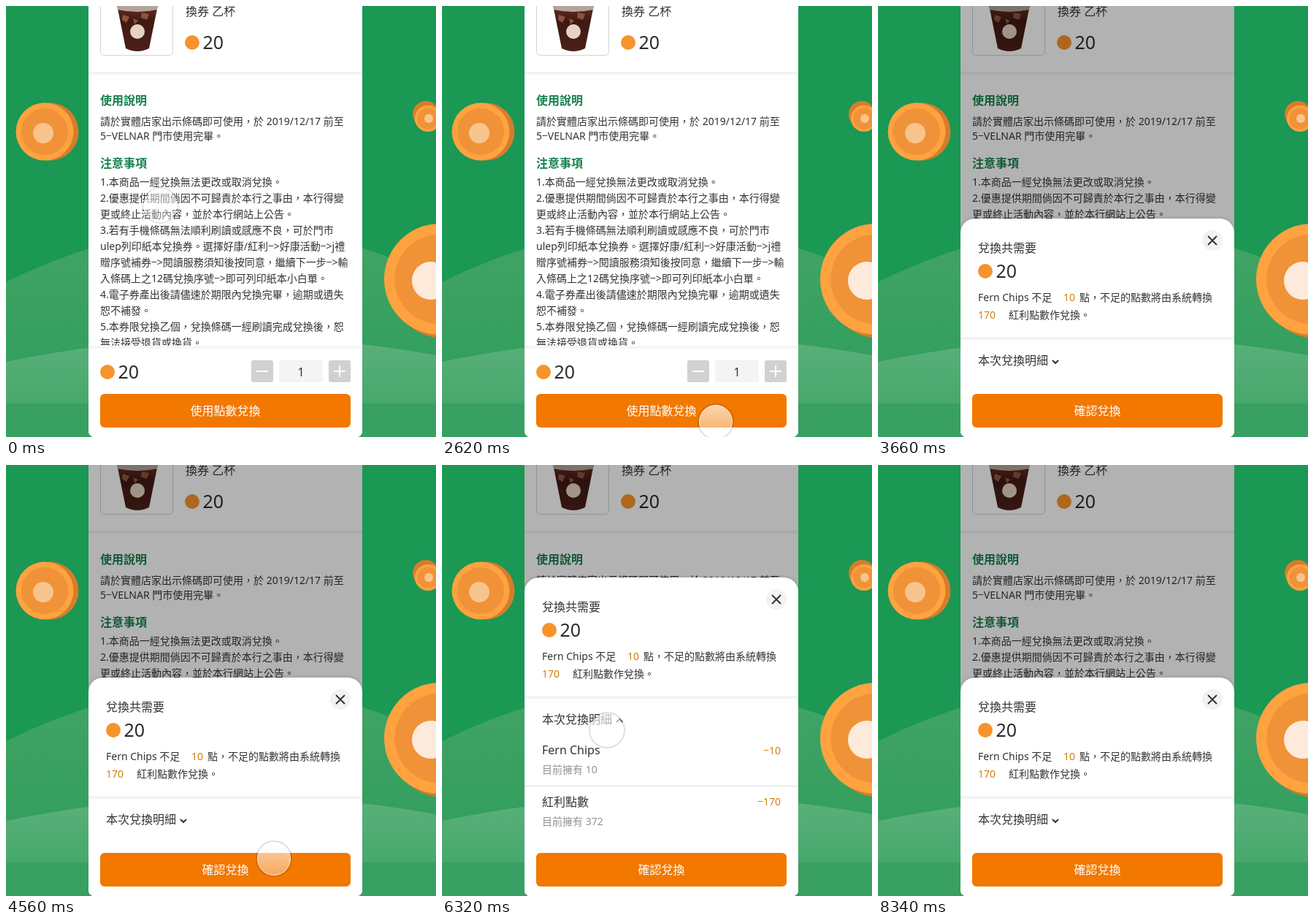
Animation of 589 by 590 pixels, one loop 8.36 s. Source, as an HTML page:

```html
<!DOCTYPE html>
<html lang="zh-Hant">
<head>
<meta charset="utf-8">
<style>
html, body { margin: 0; width: 100%; height: 100%; overflow: hidden; background: #1a9854; }
svg { display: block; width: 589px; height: 590px; }
text { font: 14px "Noto Sans", "Noto Sans CJK TC", "Noto Sans CJK", sans-serif; fill: #333; }
.t { font-size: 16px; font-weight: 500; }
.d { font-size: 16px; }
.h { font-size: 16px; font-weight: 700; fill: #14804d; }
.n { font-size: 25px; font-weight: 500; fill: #2b2b2b; }
.o { font-weight: 500; fill: #d27f12; }
.g { fill: #929292; }
.b { font-size: 16px; font-weight: 500; fill: #fff; }
.m { text-anchor: middle; }
.e { text-anchor: end; }
</style>
</head>
<body>
<svg viewBox="0 0 589 590">
  <defs>
    <linearGradient id="hill" x2="0" y2="1">
      <stop offset="0" stop-color="#42a465"/><stop offset="1" stop-color="#2b9c5a"/>
    </linearGradient>
    <linearGradient id="knoll" x2="0" y2="1">
      <stop offset="0" stop-color="#5bb07b"/><stop offset="1" stop-color="#47a86c"/>
    </linearGradient>
    <linearGradient id="glass" x2="0" y2="1">
      <stop offset="0" stop-color="#fff" stop-opacity=".68"/><stop offset="1" stop-color="#fff" stop-opacity=".36"/>
    </linearGradient>
    <linearGradient id="cola" x2="0" y2="1">
      <stop offset="0" stop-color="#6d3324"/><stop offset=".4" stop-color="#3f1912"/><stop offset="1" stop-color="#4d2018"/>
    </linearGradient>
    <clipPath id="phone"><rect x="113" y="-20" width="375" height="610" rx="8"/></clipPath>
  </defs>

  <rect width="589" height="590" fill="#1a9854"/>
  <path d="M0 378Q300 230 589 372V590H0Z" fill="url(#hill)"/>
  <path d="M0 487Q300 425 589 478V544H0Z" fill="url(#knoll)"/>
  <rect y="544" width="589" height="46" fill="#38a062"/>
  <g id="coins"></g>

  <g clip-path="url(#phone)">
    <rect x="113" width="375" height="590" fill="#fff"/>
    <rect x="129.5" y="-20" width="99" height="87.5" rx="5" fill="#fff" stroke="#d2d2d2"/>
    <path d="M151-6H209L196 58Q180 66 164 58Z" fill="url(#cola)"/>
    <path d="M151-6H209L207 5Q180 11 153 5Z" fill="#b3a49c"/>
    <path d="M160 12l9 3-4 8-6-4zM186 9l10 2-3 8-8-3zM174 17l7 3-5 5z" fill="#8b5441"/>
    <circle cx="180" cy="35" r="10" fill="#e5d3c4"/>
    <rect x="113" y="90" width="375" height="4" fill="#f3f3f3"/>
    <g id="page"></g>

    <rect x="113" y="465" width="375" height="4" fill="#f6f6f6"/>
    <rect x="113" y="469" width="375" height="121" fill="#fff"/>
    <g fill="#d1d1d1">
      <rect x="336" y="485" width="30" height="30" rx="3"/>
      <rect x="442" y="485" width="30" height="30" rx="3"/>
      <rect x="374" y="485" width="60" height="30" rx="3" fill="#f4f4f4"/>
    </g>
    <path d="M343 500h16M449 500h16M457 492v16" stroke="#fff" stroke-width="2"/>
    <rect x="129" y="531" width="343" height="46" rx="6" fill="#f27800"/>
    <g id="foot"></g>

    <rect id="dim" x="113" width="375" height="590"/>
    <g id="sheet">
      <rect x="110" y="-3" width="381" height="640" rx="23" opacity=".06"/>
      <rect x="113" width="375" height="640" rx="20" fill="#fff"/>
      <circle cx="458" cy="30" r="14" fill="#f2f2f2"/>
      <path d="M452 24l12 12M464 24l-12 12" stroke="#333" stroke-width="2"/>
      <rect x="113" y="162" width="375" height="4" fill="#f3f3f3"/>
      <path id="chevron" d="M-4-2L0 2L4-2" fill="none" stroke="#333" stroke-width="2"/>
      <rect x="113" y="285" width="375" height="1" fill="#dedede"/>
      <g id="detail"></g>
    </g>
    <g id="confirm">
      <rect x="113" y="514" width="375" height="100" fill="#fff"/>
      <rect x="129" y="531" width="343" height="46" rx="6" fill="#f27800"/>
      <text class="b m" x="300.5" y="560">確認兌換</text>
    </g>
  </g>

  <g id="touch">
    <circle r="24" fill="none" stroke="#000" stroke-opacity=".13" stroke-width="2"/>
    <circle r="22.5" fill="url(#glass)" stroke="#fff" stroke-opacity=".8"/>
  </g>
</svg>
<script>
const $ = id => document.getElementById(id);
const text = (x, y, s, cls = '') => `<text class="${cls}" x="${x}" y="${y}">${s}</text>`;
const disc = (x, y, r, fill) => `<circle cx="${x}" cy="${y}" r="${r}" fill="${fill}"/>`;
const points = (x, y) => disc(x, y, 10, '#f7932b') + text(x + 14.5, y + 8.5, '20', 'n');
const coin = (x, y, r, dx, dy, mark, color) =>
  disc(x + dx, y + dy, r, '#d67d2b') + disc(x, y, r, '#ffa240') +
  disc(x, y, r * .81, '#f09238') + disc(x + mark[0], y + mark[1], mark[2], color);

$('coins').innerHTML =
  coin(53, 172, 39.5, 7, 0, [-2, 2, 14], '#f8c48d') +
  coin(594, 374, 76, 7, 5, [-12, 2, 26], '#fdeada') +
  coin(578, 154, 18, -3, -6, [1, 0, 6], '#f8c48d');

const notes = [
  '1.本商品一經兌換無法更改或取消兌換。',
  '2.優惠提供期間倘因不可歸責於本行之事由，本行得變',
  '更或終止活動內容，並於本行網站上公告。',
  '3.若有手機條碼無法順利刷讀或感應不良，可於門市',
  'ulep列印紙本兌換券。選擇好康/紅利−&gt;好康活動−&gt;j禮',
  '贈序號補券−&gt;閱讀服務須知後按同意，繼續下一步−&gt;輸',
  '入條碼上之12碼兌換序號−&gt;即可列印紙本小白單。',
  '4.電子券產出後請儘速於期限內兌換完畢，逾期或遺失',
  '恕不補發。',
  '5.本券限兌換乙個，兌換條碼一經刷讀完成兌換後，恕',
  '無法接受退貨或換貨。'
];
$('page').innerHTML =
  text(246, 13, '換券 乙杯', 't') + points(255, 50) +
  text(129, 135, '使用說明', 'h') +
  text(129, 163, '請於實體店家出示條碼即可使用，於 2019/12/17 前至') +
  text(129, 183, '5−VELNAR 門市使用完畢。') +
  text(129, 221, '注意事項', 'h') +
  notes.map((s, i) => text(129, 246 + 22 * i, s)).join('');

$('foot').innerHTML = points(139, 501) + text(404, 507, '1', 't m') +
  text(300.5, 560, '使用點數兌換', 'b m');

$('detail').innerHTML =
  text(137, 46, '兌換共需要', 't') + points(147, 72) +
  text(137, 113, 'Fern Chips 不足') + text(254, 113, '10', 'o') +
  text(276, 113, '點，不足的點數將由系統轉換') +
  text(137, 137, '170', 'o') + text(179, 137, '紅利點數作兌換。') +
  text(137, 200, '本次兌換明細', 't') +
  text(137, 242, 'Fern Chips', 'd') + text(464, 242, '−10', 'o e') +
  text(137, 268, '目前擁有 10', 'g') +
  text(137, 313, '紅利點數', 'd') + text(464, 312, '−170', 'o e') +
  text(137, 339, '目前擁有 372', 'g');

// Touch path: time, x, y, opacity
const path = [
  [0, 211.5, 273, .8], [1080, 213, 276, .8], [1650, 214, 278, .8],
  [2520, 374, 563, 1], [2620, 375, 569, 1], [2760, 377, 569, 1], [3080, 478, 562, 0],
  [4220, 440, 572, 0], [4400, 412, 560, 1], [4560, 367, 539, 1], [5000, 226, 490, 1],
  [5200, 226, 488, 1], [5800, 226, 370, 1], [6320, 226, 363, 1],
  [6700, 226, 354, 1], [7000, 226, 354, 0], [8360, 226, 354, 0]
];
const ramp = (t, a, b) => Math.min(1, Math.max(0, (t - a) / (b - a)));
const ease = (t, a, b) => {
  const u = ramp(t, a, b);
  return u < .5 ? 4 * u ** 3 : 1 - 4 * (1 - u) ** 3;
};

function draw(now) {
  const t = now % 8360;
  const open = ease(t, 5150, 5700) - ease(t, 6750, 7300);
  const slide = 299 * (1 - ease(t, 2940, 3500));
  $('dim').setAttribute('opacity', .3 * ramp(t, 2850, 3120));
  $('sheet').setAttribute('transform', `translate(0 ${291 + slide - 137 * open})`);
  $('confirm').setAttribute('transform', `translate(0 ${slide})`);
  $('sheet').setAttribute('visibility', t < 2940 ? 'hidden' : 'visible');
  $('confirm').setAttribute('visibility', t < 2940 ? 'hidden' : 'visible');
  $('chevron').setAttribute('transform', `translate(243 196) scale(1 ${1 - 2 * open})`);

  const i = path.findIndex(p => p[0] > t);
  const a = path[i - 1], b = path[i], u = ramp(t, a[0], b[0]), s = u * u * (3 - 2 * u);
  const [, x, y, alpha] = a.map((v, k) => v + (b[k] - v) * s);
  $('touch').setAttribute('transform', `translate(${x} ${y})`);
  $('touch').setAttribute('opacity', alpha);
}
const start = performance.now();
function tick() {
  draw(performance.now() - start);
  requestAnimationFrame(tick);
}
tick();
</script>
</body>
</html>
```
